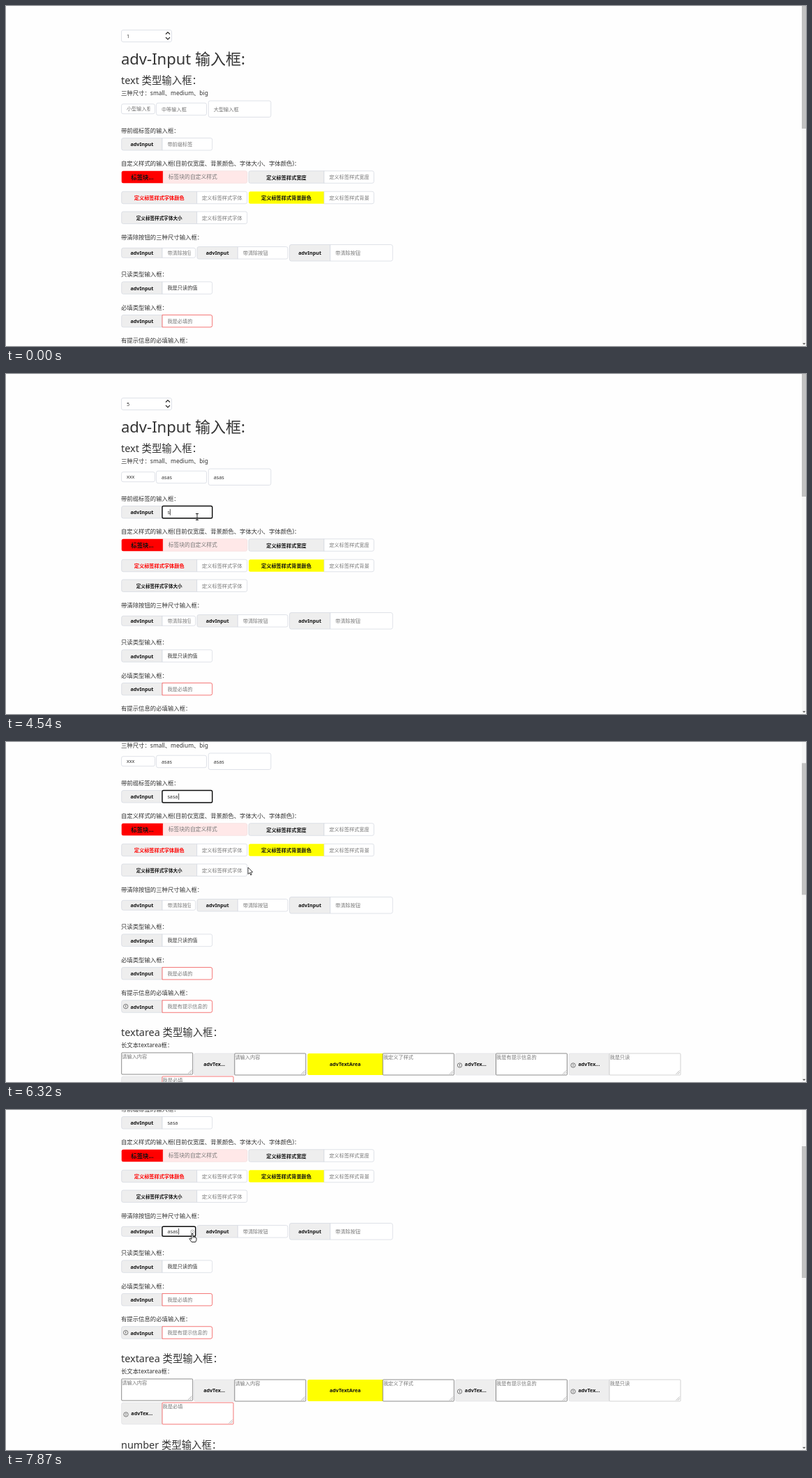
Animation of 1147 by 488 pixels, one loop 8000 ms. Source, as an HTML page with a canvas:

```html
<!DOCTYPE html>
<html lang="zh-CN">
<head>
<meta charset="utf-8">
<title>adv-Input</title>
<style>
html, body { margin: 0; width: 100%; height: 100%; overflow: hidden; background: #fefefe; }
canvas { display: block; }
</style>
</head>
<body>
<canvas id="stage" width="1147" height="488"></canvas>
<script>
const W = 1147, H = 488, LOOP = 8000;
const PX = 0.6; // size of one page pixel on the stage
const ctx = document.getElementById('stage').getContext('2d');
const FONT = '"Noto Sans", "Noto Sans CJK SC", "Noto Sans CJK", sans-serif';
const LINE = '#d4d8e0', DARK = '#333', BLACK = '#111', HINT = '#777', TAG = '#eee', RED = '#f04848', GREY = '#666';

const smooth = u => { u = Math.min(1, Math.max(0, u)); return u * u * (3 - 2 * u); };

// Wheel notches, each moving the page by 60 px, in whole page pixels
const NOTCHES = [5314, 5560, 6326], NOTCH_MS = 160;
const scrollAt = t =>
  Math.round(NOTCHES.reduce((sum, start) => sum + 60 * smooth((t - start) / NOTCH_MS), 0) / PX) * PX;

const typed = (t, text, start, gap) =>
  t < start ? '' : text.slice(0, 1 + Math.floor((t - start) / gap));
const within = (t, from, to) => t >= from && t < to;

// Pointer stops: time, x, y, and the shape used from then on
const POINTER = [
  [130, 488, 80, 'arrow'], [420, 330, 44, 'arrow'], [680, 206, 18, 'arrow'], [920, 232, 38, 'hand'],
  [1500, 232, 38, 'arrow'], [1790, 208, 151, 'beam'], [1890, 200, 162, 'beam'], [2050, 196, 148, 'beam'],
  [2640, 196, 148, 'beam'], [2820, 257, 150, 'beam'], [3070, 257, 150, 'beam'], [3220, 325, 150, 'beam'],
  [3760, 325, 150, 'beam'], [4070, 285, 213, 'beam'], [4200, 274, 205, 'beam'], [4840, 274, 205, 'beam'],
  [5100, 345, 242, 'beam'], [5250, 345, 240, 'beam'], [5400, 343.5, 228, 'beam'], [5940, 356, 190, 'arrow'],
  [6090, 356, 190, 'arrow'], [6320, 347, 180, 'arrow'], [6420, 322, 176, 'arrow'], [6880, 258, 186, 'beam'],
  [7010, 252, 177, 'beam'], [7660, 252, 177, 'beam'], [7780, 267, 177.5, 'hand'], [LOOP, 267, 177.5, 'hand']
];
const CLICKS = [1020, 1160, 1300, 1440, 2050, 2850, 3270, 4200, 7010];

function text(str, x, cy, size = 7.2, color = DARK, weight = 400, align = 'left') {
  ctx.font = `${weight} ${size}px ${FONT}`;
  ctx.fillStyle = color;
  ctx.textAlign = align;
  ctx.fillText(str, x, cy + size * 0.38);
}

function box(x, y, w, h, radius, fill, stroke, width = 0.75) {
  ctx.beginPath();
  ctx.roundRect(x, y, w, h, radius);
  if (fill) { ctx.fillStyle = fill; ctx.fill(); }
  if (stroke) { ctx.strokeStyle = stroke; ctx.lineWidth = width; ctx.stroke(); }
}

function path(points, color, width = 1, fill, close) {
  ctx.beginPath();
  points.forEach(([x, y]) => ctx.lineTo(x, y));
  if (close) ctx.closePath();
  if (fill) { ctx.fillStyle = fill; ctx.fill(); }
  ctx.strokeStyle = color;
  ctx.lineWidth = width;
  ctx.stroke();
}

function circle(x, y, r, fill, stroke) {
  ctx.beginPath();
  ctx.arc(x, y, r, 0, Math.PI * 2);
  if (fill) { ctx.fillStyle = fill; ctx.fill(); }
  if (stroke) { ctx.strokeStyle = stroke; ctx.lineWidth = 0.7; ctx.stroke(); }
}

function infoIcon(x, y) {
  circle(x, y, 3.2, null, '#444');
  path([[x, y - 1.8], [x, y + 0.5]], '#444', 0.8);
  path([[x, y + 1.1], [x, y + 1.9]], '#444', 0.8);
}

function input(x, cy, w, h, hint, o = {}) {
  const { value = '', focus, border = LINE, radius = 2.5, bg = '#fff', size = 7.2 } = o;
  const y = cy - h / 2;
  box(x, y, w, h, radius, bg, border);
  ctx.save();
  ctx.beginPath();
  ctx.rect(x + 6.5, y, w - 13.5, h);
  ctx.clip();
  text(value || hint, x + 7.4, cy, size, value ? DARK : HINT);
  ctx.restore();
  if (!focus) return;
  const caret = x + 7.8 + (value ? ctx.measureText(value).width : 0);
  path([[caret, cy - 4.5], [caret, cy + 4.5]], '#222', 0.8);
  box(x, y, w, h, 1.8, null, '#0c0c0c', 1.4);
}

function tagged(x, cy, split, right, h, label, hint, o = {}) {
  const { tagBg = TAG, tagColor = BLACK, tagSize = 7.2, icon } = o;
  box(x, cy - h / 2, split - x, h, [2.5, 0, 0, 2.5], tagBg, tagBg === TAG && LINE);
  text(label, (x + split) / 2, cy + 0.4, tagSize, tagColor, 700, 'center');
  if (icon) infoIcon(x + 6, cy);
  input(split, cy, right - split, h, hint, { radius: [0, 2.5, 2.5, 0], ...o });
}

function area(x, y, hint, border = GREY) {
  box(x, y, 102, 31, 1, '#fff', border);
  text(hint, x + 0.6, y + 5.5, 7.2, HINT);
  for (const d of [5, 2.5]) path([[x + 100.5 - d, y + 29.8], [x + 100.8, y + 29.5 - d]], '#888', 0.6);
}

function taggedArea(x, y, tagWidth, label, hint, { bg = TAG, icon, border } = {}) {
  box(x, y, tagWidth, 31, [2.5, 0, 0, 2.5], bg, bg === TAG && '#e0e0e4');
  text(label, x + tagWidth / 2, y + 15.5, 7.2, BLACK, 700, 'center');
  if (icon) infoIcon(x + 6.3, y + 17);
  area(x + tagWidth, y, hint, border);
}

function drawPage(t) {
  const count = 1 + CLICKS.filter((c, i) => i < 4 && t >= c).length;
  box(165.5, 34.5, 72, 17, 2.5, '#fff', LINE);
  text(String(count), 173, 43);
  path([[229, 40.5], [232, 37.6], [235, 40.5]], '#222', 1.1);
  path([[229, 45], [232, 47.9], [235, 45]], '#222', 1.1);

  text('adv-Input 输入框:', 165, 76, 22);
  text('text 类型输入框：', 165, 107, 14.4);
  text('三种尺寸：small、medium、big', 165, 125.3, 8.4);
  input(165.5, 147.7, 48, 14, '小型输入框',
    { value: typed(t, 'xxx', 2430, 90), focus: within(t, 1990, 2850) });
  input(215.5, 148, 72, 17.5, '中等输入框',
    { value: typed(t, 'asas', 2900, 55), focus: within(t, 2850, 3270) });
  input(290.3, 147.8, 89.5, 23.5, '大型输入框',
    { value: typed(t, 'asas', 3420, 90), focus: within(t, 3270, 4200) });

  text('带前缀标签的输入框：', 165, 178.7, 8.4);
  const prefix = t < 4740 ? typed(t, 's', 4540, 90) : 's' + typed(t, 'asa', 4740, 70);
  tagged(165.7, 198.3, 224, 295.7, 17.5, 'advInput', '带前缀标签',
    { value: prefix, focus: within(t, 4200, 7010) });

  text('自定义样式的输入框(目前仅宽度、背景颜色、字体大小、字体颜色)：', 165, 226.2, 8.4);
  tagged(165.7, 245.5, 225.3, 345.7, 17.5, '标签块...', '标签块的自定义样式',
    { tagBg: '#f00', tagSize: 8.4, bg: '#ffe8e8', size: 7.8, border: '#f3dede' });
  tagged(348, 245.5, 456, 527.5, 17.5, '定义标签样式宽度', '定义标签样式宽度');
  tagged(165.7, 275, 273.7, 345.7, 17.5, '定义标签样式字体颜色', '定义标签样式字体颜色', { tagColor: '#f00' });
  tagged(348, 275, 456, 527.5, 17.5, '定义标签样式背景颜色', '定义标签样式背景颜色', { tagBg: '#ff0' });
  tagged(165.7, 303.8, 273.7, 345.7, 17.5, '定义标签样式字体大小', '定义标签样式字体大小', { tagSize: 6.6 });

  text('带清除按钮的三种尺寸输入框：', 165, 331.7, 8.4);
  const clearable = typed(t, 'asas', 7310, 100);
  tagged(165.7, 354.3, 224, 271.7, 14, 'advInput', '带清除按钮', { value: clearable, focus: t >= 7010 });
  if (clearable) {
    circle(267.3, 354.6, 2.6, null, '#999');
    path([[266.2, 353.5], [268.4, 355.7]], '#999', 0.6);
    path([[268.4, 353.5], [266.2, 355.7]], '#999', 0.6);
  }
  tagged(274, 354.3, 332.3, 404, 17.5, 'advInput', '带清除按钮');
  tagged(406.5, 354.3, 464.8, 554.3, 23.5, 'advInput', '带清除按钮');

  text('只读类型输入框：', 165, 385.2, 8.4);
  tagged(165.7, 404.6, 224, 295.7, 17.5, 'advInput', '', { value: '我是只读的值' });
  text('必填类型输入框：', 165, 432.7, 8.4);
  tagged(165.7, 452.2, 224, 295.7, 17.5, 'advInput', '我是必填的', { border: RED });
  text('有提示信息的必填输入框：', 165, 480.2, 8.4);
  tagged(165.7, 499.5, 224, 295.7, 17.5, 'advInput', '我是有提示信息的必填', { border: RED, icon: true });

  text('textarea 类型输入框：', 165, 537, 14.4);
  text('长文本textarea框：', 165, 555.2, 8.4);
  area(165.7, 566, '请输入内容');
  taggedArea(269.5, 567, 58.3, 'advTex...', '请输入内容');
  taggedArea(432.3, 567, 108, 'advTextArea', '我定义了样式', { bg: '#ff0' });
  taggedArea(644.2, 567, 58.3, 'advTex...', '我是有提示信息的', { icon: true });
  taggedArea(806.8, 567, 58.3, 'advTex...', '我是只读', { icon: true, border: '#c4c4c4' });
  taggedArea(165.7, 600, 58.3, 'advTex...', '我是必填', { icon: true, border: RED });
  text('number 类型输入框：', 165, 660.3, 14.4);
}

function drawScrollbar(offset) {
  ctx.fillStyle = '#f6f6f6';
  ctx.fillRect(1141, 0, 6, H);
  ctx.fillStyle = '#c1c1c1';
  ctx.fillRect(1141, -13 + offset * 0.361, 6, 189);
  path([[1142.5, 484], [1146, 484], [1144.2, 486]], '#555', 0.4, '#555', true);
}

const shapes = {
  arrow() {
    path([[0, 0], [0, 9.6], [2.2, 7.6], [3.8, 11], [5.2, 10.4], [3.7, 7.1], [6.7, 6.8]], '#111', 0.8, '#fff', true);
  },
  beam() {
    for (const y of [-4.5, 4.5]) path([[-2, y], [2, y]], '#222', 1);
    path([[0, -4.5], [0, 4.5]], '#222', 1);
  },
  hand() {
    path([[-1, 0.3], [0, -0.3], [1, 0.3], [1, 4.2], [3, 4.2], [5, 5], [6, 6], [6, 9], [4.8, 12],
      [-0.8, 12], [-2.8, 9.3], [-4, 7], [-3.2, 6.2], [-1, 8]], '#111', 0.9, '#fff', true);
    for (const x of [1, 2.8, 4.5]) path([[x, 4.6], [x, 6.4]], '#111', 0.6);
  }
};

function drawPointer(t) {
  const next = POINTER.findIndex(stop => stop[0] > t);
  if (next < 1) return;
  const [t0, x0, y0, shape] = POINTER[next - 1], [t1, x1, y1] = POINTER[next];
  const u = smooth((t - t0) / (t1 - t0));
  ctx.save();
  ctx.translate(x0 + (x1 - x0) * u, y0 + (y1 - y0) * u);
  if (CLICKS.some(c => within(t, c, c + 80))) circle(0, 0, 5, 'rgba(240,235,0,.65)');
  shapes[shape]();
  ctx.restore();
}

function frame(now) {
  const t = now % LOOP, offset = scrollAt(t);
  ctx.fillStyle = '#fefefe';
  ctx.fillRect(0, 0, W, H);
  ctx.save();
  ctx.translate(0, -offset);
  drawPage(t);
  ctx.restore();
  drawScrollbar(offset);
  drawPointer(t);
  requestAnimationFrame(frame);
}
requestAnimationFrame(frame);
</script>
</body>
</html>
```
